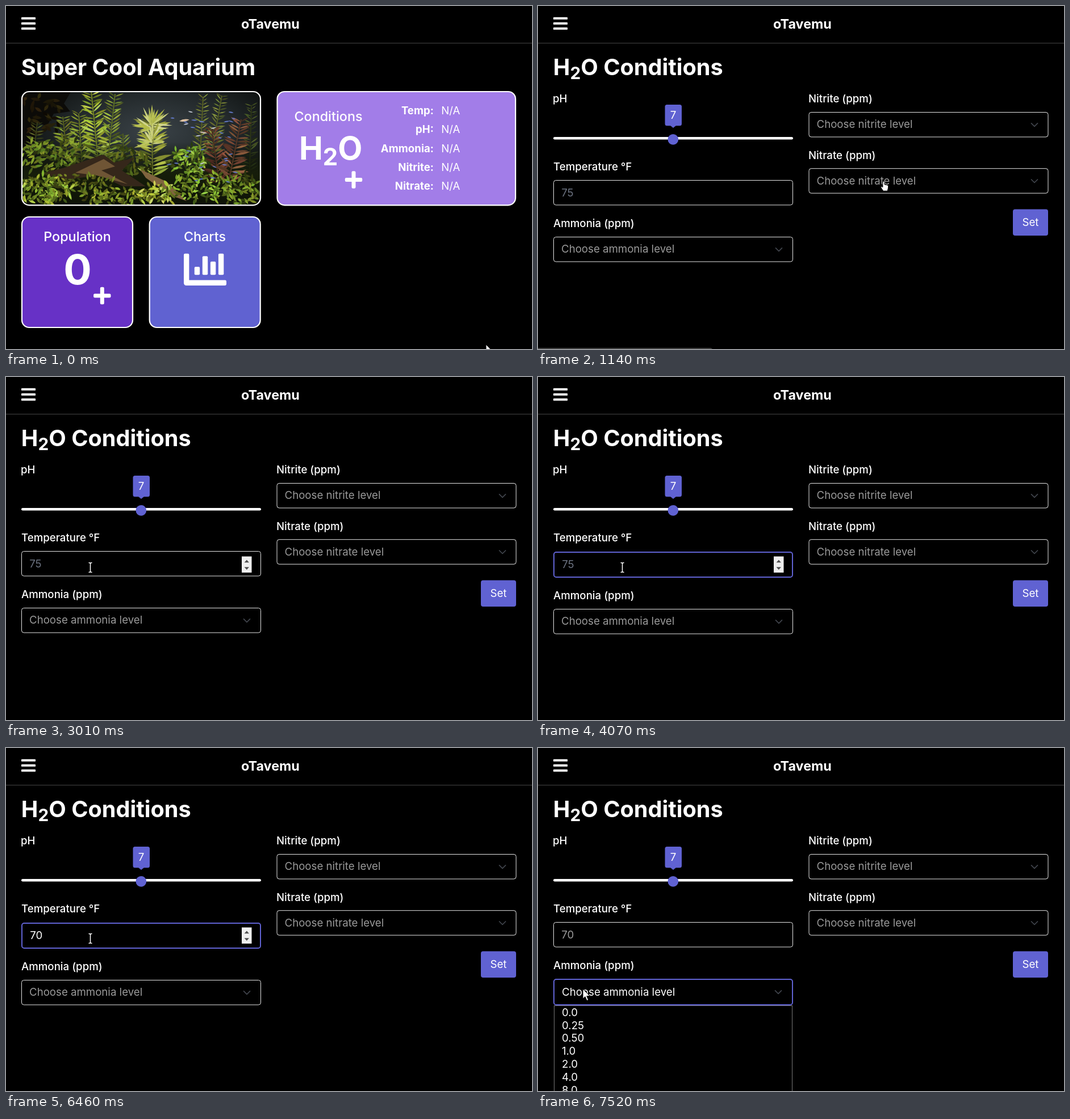
Recreate the animation shown at these times as an HTML page. Size 926 px wide and 605 px high, loop 8000 ms.

```html
<!DOCTYPE html>
<html lang="en">
<head>
<meta charset="utf-8">
<title>Aquarium conditions</title>
<style>
  html, body { margin: 0; width: 100%; height: 100%; overflow: hidden; background: #000; }
  svg { display: block; width: 926px; height: 605px; }
  text { font: 400 18.67px Inter, sans-serif; font-optical-sizing: none; fill: #fff; }
  .label { font-weight: 500; }
  .bold { font-weight: 700; }
  .brand { font-weight: 700; font-size: 23.33px; }
  .h1 { font-weight: 700; font-size: 39.67px; }
  .name { font-weight: 500; font-size: 23.33px; }
  .mid { text-anchor: middle; }
  .end { text-anchor: end; }
  .hint { fill: #9a9a9a; }
  .dim { fill: #6b7280; }
  .card { stroke: #fff; stroke-width: 2.2; }
  .box { fill: #000; stroke: #e5e5e5; }
  .focus { fill: #000; stroke: #6062d2; stroke-width: 2; }
  .chevron { fill: none; stroke: #41454d; stroke-width: 1.7; stroke-linecap: round; stroke-linejoin: round; }
  .cursor { fill: #fff; stroke: #000; stroke-linejoin: round; }
</style>
</head>
<body>
<svg viewBox="0 0 926 605">
  <defs>
    <radialGradient id="water" cx=".55" cy=".35" r=".6">
      <stop offset="0" stop-color="#3a4247"/>
      <stop offset=".55" stop-color="#23292b"/>
      <stop offset="1" stop-color="#0b0e0d"/>
    </radialGradient>
    <linearGradient id="floor" x2="0" y2="1">
      <stop offset="0" stop-color="#10160a" stop-opacity="0"/>
      <stop offset=".5" stop-color="#161d0a"/>
      <stop offset="1" stop-color="#0d1206"/>
    </linearGradient>
    <clipPath id="frame"><rect x="28" y="151" width="420" height="200" rx="13"/></clipPath>
    <g id="plus" fill="#fff">
      <rect x="-15.2" y="-3.5" width="30.4" height="7" rx="2.2"/>
      <rect x="-3.5" y="-15.2" width="7" height="30.4" rx="2.2"/>
    </g>
    <path id="chevron" class="chevron" d="M-5.5 -2.7L0 2.8L5.5 -2.7"/>
  </defs>

  <g fill="#fff">
    <rect x="27" y="19.8" width="25" height="4" rx=".9"/>
    <rect x="27" y="28.8" width="25" height="4" rx=".9"/>
    <rect x="27" y="37.8" width="25" height="4" rx=".9"/>
  </g>
  <text class="brand mid" x="465.5" y="40">oTavemu</text>
  <path d="M0 65.5H926" stroke="#454545"/>

  <g id="home">
    <text class="h1" x="26.8" y="121.5">Super Cool Aquarium</text>
    <g id="photo" clip-path="url(#frame)"></g>
    <rect class="card" x="28" y="151" width="420" height="200.3" rx="13" fill="none"/>

    <rect class="card" x="477.5" y="151" width="419.5" height="200.3" rx="13" fill="#a27de8"/>
    <text class="name mid" x="567.5" y="203">Conditions</text>
    <text class="bold mid" x="571.7" y="270.5" style="font-size:56px">H<tspan dy="10" font-size="42">2</tspan><tspan dy="-10">O</tspan></text>
    <use href="#plus" x="612" y="306.5"/>
    <g id="readings"></g>

    <rect class="card" x="28" y="372" width="195" height="195" rx="13" fill="#6731c6"/>
    <text class="name mid" x="125.5" y="414.5">Population</text>
    <text class="bold mid" x="126" y="491" style="font-size:73.5px">0</text>
    <use href="#plus" x="169.3" y="511"/>

    <rect class="card" x="252.7" y="372" width="195" height="195" rx="13" fill="#6062d1"/>
    <text class="name mid" x="350" y="414.5">Charts</text>
    <g fill="#fff" transform="translate(313 427.3) scale(.1465)">
      <path d="M16 64H48Q64 64 64 80V384H496Q512 384 512 400V432Q512 448 496 448H32Q0 448 0 416V80Q0 64 16 64Z"/>
      <rect x="128" y="224" width="64" height="96" rx="13"/>
      <rect x="224" y="96" width="64" height="224" rx="13"/>
      <rect x="320" y="160" width="64" height="160" rx="13"/>
      <rect x="416" y="64" width="64" height="256" rx="13"/>
    </g>
  </g>

  <g id="form">
    <text class="h1" x="26.8" y="121.5">H<tspan dy="7.5" font-size="29.75">2</tspan><tspan dy="-7.5">O Conditions</tspan></text>

    <text class="label" x="26" y="169.5">pH</text>
    <rect x="27" y="231" width="422" height="4.6" rx="2.3" fill="#fff"/>
    <circle cx="237.8" cy="235.3" r="9.4" fill="#6062d2"/>
    <path d="M232.5 210.5H243.5L238 215Z" fill="#6062d2"/>
    <rect x="223.5" y="174" width="29.5" height="37.3" rx="3.5" fill="#6062d2"/>
    <text class="mid" x="238" y="198.5">7</text>

    <text class="label" x="27" y="290">Temperature °F</text>
    <rect id="tempBox" rx="4"/>
    <text id="temp"></text>
    <rect id="caret" y="319.5" width="1.3" height="22" fill="#fff"/>
    <g id="spinner">
      <rect x="415" y="316.5" width="17.5" height="28.5" fill="#efefef"/>
      <path d="M419.5 327.2L423.8 322.4L428 327.2ZM419.5 335.2L423.8 340L428 335.2Z" fill="#505050"/>
    </g>

    <g id="ammonia">
      <text class="label" x="27" y="390">Ammonia (ppm)</text>
      <g id="ammoniaIdle">
        <rect class="box" x="27.5" y="407.5" width="421" height="43.5" rx="4"/>
        <text class="hint" x="41" y="435">Choose ammonia level</text>
        <use href="#chevron" x="424" y="429.5"/>
      </g>
      <g id="ammoniaFocus">
        <rect class="focus" x="28" y="408" width="420" height="45" rx="4"/>
        <text x="42" y="436.5">Choose ammonia level</text>
        <use href="#chevron" x="423" y="430.5"/>
      </g>
    </g>
    <g id="list"><rect x="28.5" y="454.5" width="419" height="200" stroke="#777"/></g>

    <text class="label" x="476" y="169.5">Nitrite (ppm)</text>
    <rect class="box" x="477" y="187.5" width="421" height="43.5" rx="4"/>
    <text class="hint" x="490.5" y="215">Choose nitrite level</text>
    <use href="#chevron" x="874" y="209.5"/>

    <text class="label" x="476" y="269.5">Nitrate (ppm)</text>
    <rect class="box" x="477" y="286.7" width="421" height="43.5" rx="4"/>
    <text class="hint" x="490.5" y="314.5">Choose nitrate level</text>
    <use href="#chevron" x="874" y="308.7"/>

    <rect x="836" y="358.5" width="62" height="46.5" rx="4" fill="#6062d2"/>
    <text class="mid" x="867" y="387.5">Set</text>
  </g>

  <path id="status" fill="#3b3b3b"/>
  <circle id="press" r="11" fill="#f2e052" fill-opacity=".62"/>
  <g id="pointer">
    <path id="arrow" class="cursor" d="M0 0V17.3L4 13.6L7 20.6L9.7 19.4L6.8 12.6H12.3Z"/>
    <path id="hand" class="cursor" d="M-1.6 1.2Q0 -1 1.6 1.2V5.8L7 7Q8.6 7.6 8.2 11L6.8 17.2H-.8L-4.8 11Q-4.8 8.4 -1.6 10.6Z"/>
    <path id="beam" d="M-3 -8.5Q0 -8.5 0 -7Q0 -8.5 3 -8.5M0 -7.5V7.5M-3 8.5Q0 8.5 0 7Q0 8.5 3 8.5" fill="none" stroke="#fff" stroke-width="1.5"/>
  </g>
</svg>

<script>
const $ = id => document.getElementById(id);
const show = (id, on) => $(id).setAttribute('display', on ? 'inline' : 'none');
const setAll = (id, attrs) => { for (const k in attrs) $(id).setAttribute(k, attrs[k]); };

// Aquarium picture
let seed = 7;
const rnd = (a = 0, b = 1) => a + (b - a) * ((seed = seed * 16807 % 2147483647) / 2147483647);

function leaf(x, y, length, angle, color, width = length * .28) {
  const h = length / 2;
  return `<path transform="translate(${x.toFixed(1)} ${y.toFixed(1)}) rotate(${angle.toFixed(0)})" ` +
    `d="M0 0Q${h} ${-width} ${length} 0Q${h} ${width} 0 0" fill="${color}"/>`;
}

function fern(x0, y0, x1, y1, length, hue, sat, light) {
  const steps = Math.hypot(x1 - x0, y1 - y0) / 6;
  const heading = Math.atan2(y1 - y0, x1 - x0) * 180 / Math.PI;
  let out = `<path d="M${x0} ${y0}L${x1} ${y1}" stroke="hsl(${hue} ${sat}% ${light * .7}%)" stroke-width="2"/>`;
  for (let i = 0; i <= steps; i++) {
    const k = i / steps, size = length * (1.1 - .5 * k) * rnd(.8, 1.15);
    for (const side of [-1, 1])
      out += leaf(x0 + (x1 - x0) * k, y0 + (y1 - y0) * k, size, heading + side * rnd(45, 80),
        `hsl(${hue + rnd(-6, 6)} ${sat}% ${light * rnd(.55, 1.3)}%)`, size * .15);
  }
  return out;
}

function clump(x, y, rx, ry, count, hue, light, size = 12) {
  let out = '';
  for (let i = 0; i < count; i++) {
    const a = rnd(0, 6.28), r = Math.sqrt(rnd());
    out += leaf(x + rx * r * Math.cos(a), y + ry * r * Math.sin(a), size * rnd(.6, 1.3), rnd(-180, 180),
      `hsl(${hue + rnd(-9, 9)} 58% ${light * rnd(.35, 1.35)}%)`, size * .35);
  }
  return out;
}

function crown(x, y, length, count) {
  let out = '';
  for (let i = 0; i < count; i++)
    out += leaf(x, y + rnd(-6, 6), length * rnd(.6, 1.1), -200 + 220 * i / count, `hsl(64 46% ${rnd(38, 74)}%)`, 3.5);
  return out;
}

function fish() {
  let out = '';
  for (let i = 0; i < 34; i++)
    out += leaf(rnd(278, 400), rnd(185, 310), rnd(7, 11), rnd(-15, 22), i % 6 ? '#6279c8' : '#c6cbd8', 2.2);
  return out + leaf(305, 203, 18, -8, '#e0c3a4', 4) + leaf(340, 222, 15, 10, '#c7b5a8', 3);
}

$('photo').innerHTML = [
  '<rect x="27" y="150" width="422" height="203" fill="url(#water)"/>',
  '<path d="M27 150H115L102 172L113 186L84 190L72 212L55 205L50 240L27 250Z" fill="#0c0b08"/>',
  clump(60, 190, 36, 40, 40, 42, 9, 16),
  fern(48, 270, 55, 205, 20, 70, 45, 24),
  fern(108, 270, 100, 195, 24, 70, 52, 34),
  fern(134, 280, 128, 190, 26, 70, 52, 40),
  fern(165, 300, 150, 150, 32, 71, 58, 45),
  fern(178, 285, 192, 155, 25, 74, 50, 40),
  fern(208, 290, 206, 225, 22, 74, 48, 34),
  fern(340, 300, 347, 160, 18, 68, 45, 36),
  fern(362, 260, 380, 158, 19, 70, 44, 35),
  fern(428, 320, 432, 175, 18, 78, 42, 21),
  '<rect x="27" y="240" width="422" height="113" fill="url(#floor)"/>',
  fern(375, 310, 362, 215, 26, 18, 42, 30),
  fern(392, 310, 414, 200, 30, 20, 40, 34),
  fern(258, 300, 257, 210, 34, 68, 48, 42),
  crown(257, 212, 36, 28),
  crown(258, 238, 32, 22),
  clump(82, 262, 54, 30, 130, 75, 31, 13),
  clump(215, 275, 42, 24, 70, 72, 22, 13),
  '<path d="M60 296L100 286L172 262L190 276L226 268L204 290L246 318L205 318L165 298L110 306Z" fill="#35271a"/>',
  '<path d="M122 294L172 270L192 283L168 290L214 314L160 299Z" fill="#6f5535"/>',
  '<path d="M236 288L283 310L318 344L290 334L246 303Z" fill="#80643f"/>',
  clump(110, 312, 80, 16, 110, 70, 27, 11),
  clump(320, 272, 34, 22, 110, 80, 42, 11),
  clump(345, 316, 50, 26, 150, 78, 40, 11),
  clump(70, 326, 46, 24, 110, 74, 42, 13),
  clump(190, 335, 64, 16, 90, 70, 35, 12),
  clump(265, 332, 32, 18, 75, 70, 48, 12),
  clump(415, 324, 32, 27, 90, 76, 32, 12),
  fish()
].join('');

$('readings').innerHTML = ['Temp', 'pH', 'Ammonia', 'Nitrite', 'Nitrate'].map((name, i) => {
  const y = 191 + 33.3 * i;
  return `<text class="bold end" x="753" y="${y}">${name}:</text><text x="766.3" y="${y}">N/A</text>`;
}).join('');

$('list').innerHTML += ['0.0', '0.25', '0.50', '1.0', '2.0', '4.0', '8.0']
  .map((v, i) => `<text x="42" y="${472.8 + 22.8 * i}">${v}</text>`).join('');

// Timeline: pointer moves as [start, end, steps, x, y]
const LOOP = 8000;
const MOVES = [
  [70, 870, 12, 608.5, 309],
  [1470, 2210, 12, 241, 226],
  [2400, 2460, 2, 241, 229.5],
  [2800, 3010, 4, 148.5, 336],
  [6720, 7190, 8, 79, 425]
];
const CLICKS = [[940, 1140], [3540, 3670], [7390, 7520]];
const CARET = [[3540, 4070], [4600, 5060], [5590, 6460], [6990, 7390]];
const within = (t, spans) => spans.some(([a, b]) => t >= a && t < b);

function pointerAt(t) {
  let x = 845, y = 597;
  for (const [start, end, steps, toX, toY] of MOVES) {
    if (t < start) break;
    const k = Math.min(1, (Math.floor((t - start) / (end - start) * (steps - 1) + 1e-6) + 1) / steps);
    const ease = k * k * (3 - 2 * k);
    x += (toX - x) * ease;
    y += (toY - y) * ease;
  }
  return [x, y];
}

function draw(t) {
  const [x, y] = pointerAt(t);
  const home = t < 1140, editing = t >= 3540 && t < 7390, choosing = t >= 7390;
  const overField = !home && x < 449 && y > 308 && y < (editing ? 354 : 351);
  const onLink = home ? x > 477 && x < 898 && y < 352 : t < 1543 || (t >= 2400 && t < 2800);

  show('home', home);
  show('form', !home);

  const typed = t < 5790 ? '' : t < 5930 ? '7' : '70';
  setAll('tempBox', editing
    ? { class: 'focus', x: 28, y: 309, width: 420, height: 44 }
    : { class: 'box', x: 27.5, y: 307.5, width: 421, height: 43.5 });
  setAll('temp', {
    x: editing ? 42.2 : 41.2,
    y: editing ? 336.7 : 335.7,
    class: !typed ? 'dim' : editing ? '' : 'hint'
  });
  $('temp').textContent = typed || '75';
  $('caret').setAttribute('x', 43.5 + 10.8 * typed.length);
  show('caret', within(t, CARET));
  show('spinner', editing || overField);

  $('ammonia').setAttribute('transform', `translate(0 ${editing ? 2 : 0})`);
  show('ammoniaIdle', !choosing);
  show('ammoniaFocus', choosing);
  show('list', t >= 7520);

  const link = home ? onLink : t < 1740;
  const w = home ? 234 : 306;
  $('status').setAttribute('d', link ? `M0 605V603H${w - 3}Q${w} 603 ${w + 1} 605Z` : '');

  show('press', within(t, CLICKS));
  setAll('press', { cx: x - .5, cy: y + 2 });
  $('pointer').setAttribute('transform', `translate(${x} ${y})`);
  show('hand', onLink);
  show('beam', overField && !onLink);
  show('arrow', !overField && !onLink);
}

const began = performance.now();
function tick() {
  draw((performance.now() - began) % LOOP);
  requestAnimationFrame(tick);
}
tick();
</script>
</body>
</html>
```
